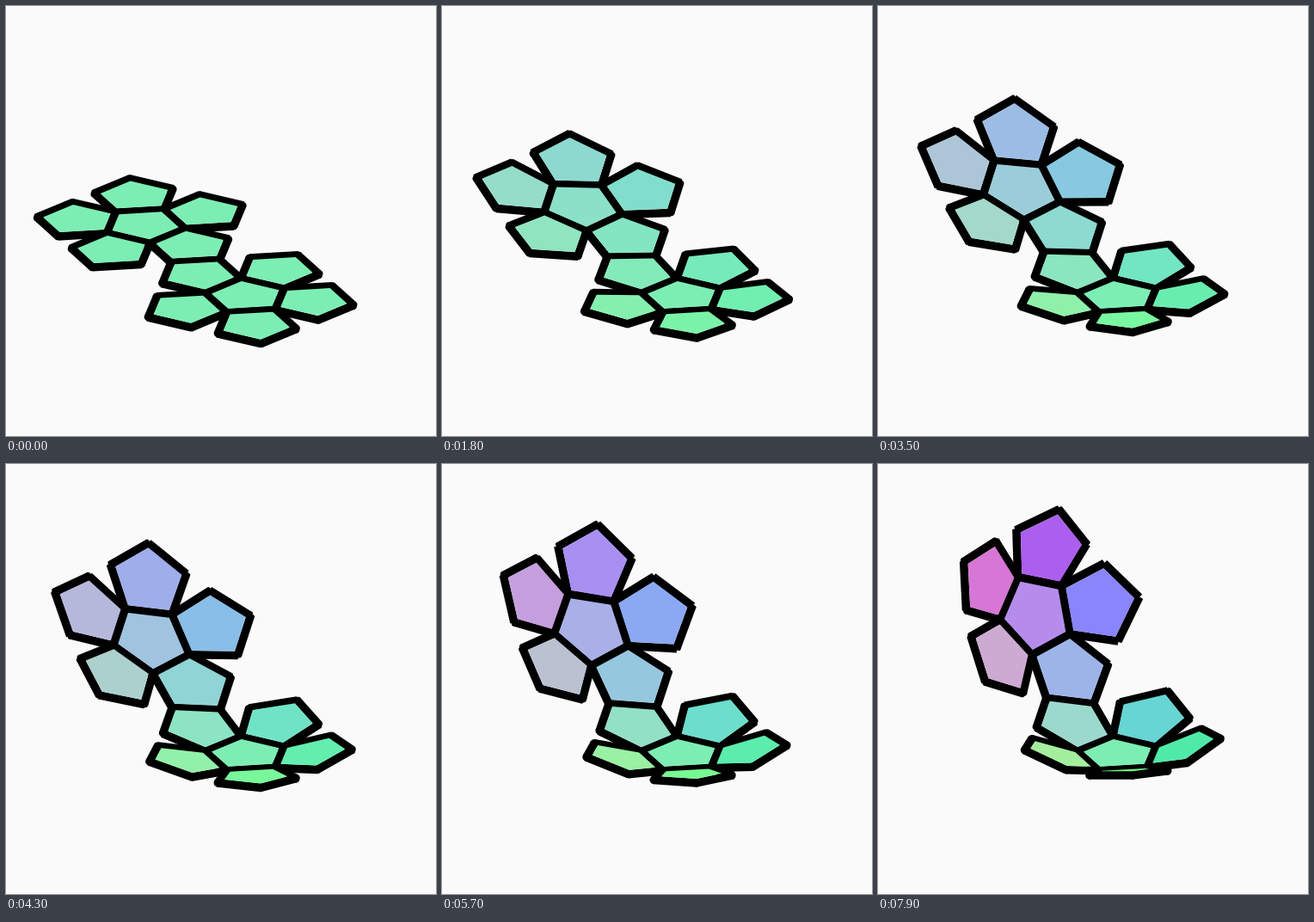
An HTML page with a canvas that plays this animation: 500x500 px, repeating every 8 s.

```html
<!DOCTYPE html>
<html lang="en">
<head>
<meta charset="utf-8">
<title>Folding dodecahedron net</title>
<style>
  html, body { margin: 0; width: 100%; height: 100%; overflow: hidden; background: #fafafa; }
  canvas { display: block; width: 500px; height: 500px; }
</style>
</head>
<body>
<canvas id="stage" width="500" height="500"></canvas>
<script>
const ctx = document.getElementById('stage').getContext('2d');

const RAD = Math.PI / 180;
const LOOP = 8000, STEP = 100;
const FULL_FOLD = 63.435 * RAD, FULL_STEPS = 240;
const SIZE = 48.4;                       // circumradius of a pentagon
const APOTHEM = SIZE * Math.cos(36 * RAD);
const TUBE = 4.8;                        // radius of the black edges
const CENTER = [279.5, 338.2, 0];
const ELEVATION = 25.7 * RAD, TURN = 7.7 * RAD;

// a * x + b * y for 3D vectors
const mix = (a, x, b, y) => x.map((v, i) => a * v + b * y[i]);
const dot2 = (a, b) => a[0] * b[0] + a[1] * b[1];
const along = (face, angle) => mix(Math.cos(angle), face.u, Math.sin(angle), face.v);

// View space: x right, y down, z towards the viewer
function baseFace() {
  const sE = Math.sin(ELEVATION), cE = Math.cos(ELEVATION);
  const sT = Math.sin(TURN), cT = Math.cos(TURN);
  return {
    o: CENTER,
    u: [-sT, -cT * sE, -cT * cE],
    v: [cT, -sT * sE, -sT * cE],
    n: [0, -cE, sE]
  };
}

// Pentagon hinged on the edge that lies in the given direction
function hinge(face, degrees, fold) {
  const a = degrees * RAD, c = Math.cos(fold), s = Math.sin(fold);
  const d = along(face, a), w = along(face, a + Math.PI / 2);
  const d2 = mix(c, d, s, face.n);
  return {
    o: mix(1, mix(1, face.o, APOTHEM, d), APOTHEM, d2),
    u: mix(-Math.cos(a), d2, Math.sin(a), w),
    v: mix(-Math.sin(a), d2, -Math.cos(a), w),
    n: mix(c, face.n, -s, d)
  };
}

function buildNet(fold) {
  const flower = core => [core, ...[36, 108, 180, 252].map(a => hinge(core, a, fold))];
  const base = baseFace();
  const link1 = hinge(base, -36, fold);
  const link2 = hinge(link1, 180, fold);
  const top = hinge(link2, -36, fold);
  return [...flower(base), link1, link2, ...flower(top)];
}

const corners = face =>
  [0, 1, 2, 3, 4].map(k => mix(1, face.o, SIZE, along(face, 72 * k * RAD)));

function drawTube(a, b) {
  const d = mix(1, b, -1, a);
  const tilt = Math.abs(d[2]) / Math.hypot(...d);
  const angle = Math.atan2(d[1], d[0]);
  ctx.beginPath();
  ctx.moveTo(a[0], a[1]);
  ctx.lineTo(b[0], b[1]);
  ctx.stroke();
  for (const p of [a, b]) {
    ctx.beginPath();
    ctx.ellipse(p[0], p[1], TUBE * tilt, TUBE, angle, 0, 2 * Math.PI);
    ctx.fill();
  }
}

// Keep the part of a convex polygon at least `gap` from the line through a
function clip(poly, a, inward, gap) {
  const dist = q => dot2(mix(1, q, -1, a), inward) - gap;
  return poly.flatMap((q, i) => {
    const next = poly[(i + 1) % poly.length];
    const e = dist(q), f = dist(next);
    const out = e >= 0 ? [q] : [];
    if (e * f < 0) out.push(mix(f / (f - e), q, -e / (f - e), next));
    return out;
  });
}

// Facing direction as a colour
const shade = n =>
  `rgb(${[n[0], -n[1], n[2]].map(c => Math.round(123.5 + 127.5 * c)).join()})`;

function drawFace(face) {
  const pts = corners(face);
  let poly = pts;
  pts.forEach((a, i) => {
    const d = mix(1, pts[(i + 1) % 5], -1, a);
    const len = Math.hypot(d[0], d[1]);
    const m = along(face, (216 + 72 * i) * RAD);
    let p = [-d[1] / len, d[0] / len];
    if (dot2(p, m) < 0) p = [-p[0], -p[1]];
    // An edge nearer than the face shows its whole radius; a farther one sinks in
    const gap = dot2(face.n, p) > 0 ? TUBE : TUBE * dot2(m, p);
    poly = clip(poly, a, p, gap);
  });
  if (poly.length < 3) return;
  ctx.fillStyle = shade(face.n);
  ctx.beginPath();
  poly.forEach(q => ctx.lineTo(q[0], q[1]));
  ctx.closePath();
  ctx.fill();
}

function draw(time) {
  const step = Math.floor((time % LOOP) / STEP);
  const net = buildNet(FULL_FOLD * step / FULL_STEPS);
  ctx.fillStyle = '#fafafa';
  ctx.fillRect(0, 0, 500, 500);
  ctx.fillStyle = ctx.strokeStyle = '#000';
  ctx.lineWidth = 2 * TUBE;
  for (const face of net) {
    const pts = corners(face);
    pts.forEach((a, i) => drawTube(a, pts[(i + 1) % 5]));
  }
  net.forEach(drawFace);
}

function tick() {
  draw(performance.now());
  requestAnimationFrame(tick);
}
tick();
</script>
</body>
</html>
```
